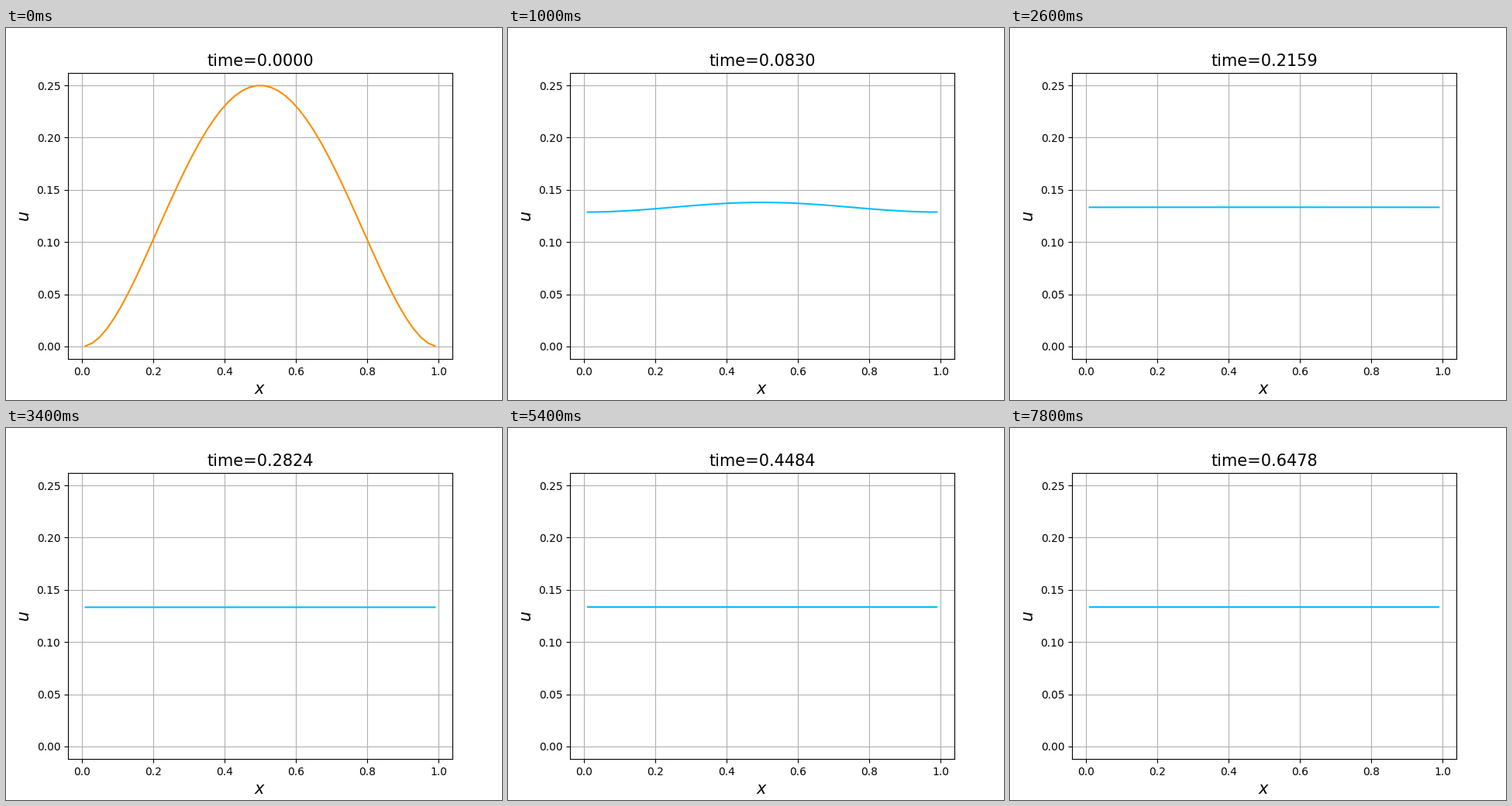
Write a matplotlib script that moves like this. It is 640 by 480 pixels and loops after 8 s.

```python
import matplotlib.pyplot as plt
import numpy as np
from matplotlib.animation import FuncAnimation

FRAMES = 40
STEP = 0.0166091  # simulated time per frame
CELLS = 50

x = (np.arange(CELLS) + 0.5) / CELLS
n = np.arange(1, 101)
modes = np.cos(2 * np.pi * np.outer(x, n))
weights = -12 / (np.pi * n) ** 4 * np.pi ** 0


def initial():
    return 4 * (x * (1 - x)) ** 2


def heat(t):
    """Insulated rod: cosine series of the initial profile, decaying in time."""
    if t == 0:
        return initial()
    return 2 / 15 + modes @ (weights * np.exp(-(2 * np.pi * n) ** 2 * t))


fig, ax = plt.subplots(figsize=(6.4, 4.8), dpi=100)
line, = ax.plot(x, initial(), color="darkorange")
title = ax.set_title("", fontsize=15)
ax.set_xlabel("$x$", fontsize=15)
ax.set_ylabel("$u$", fontsize=15)
ax.grid()
ax.set_xlim(ax.get_xlim())
ax.set_ylim(ax.get_ylim())


def update(i):
    t = i * STEP
    line.set_ydata(heat(t))
    line.set_color("deepskyblue" if i else "darkorange")
    title.set_text(f"time={t:.4f}")
    return line, title


anim = FuncAnimation(fig, update, frames=FRAMES, interval=200,
                     repeat=True, repeat_delay=0, blit=False)
plt.show()
```
